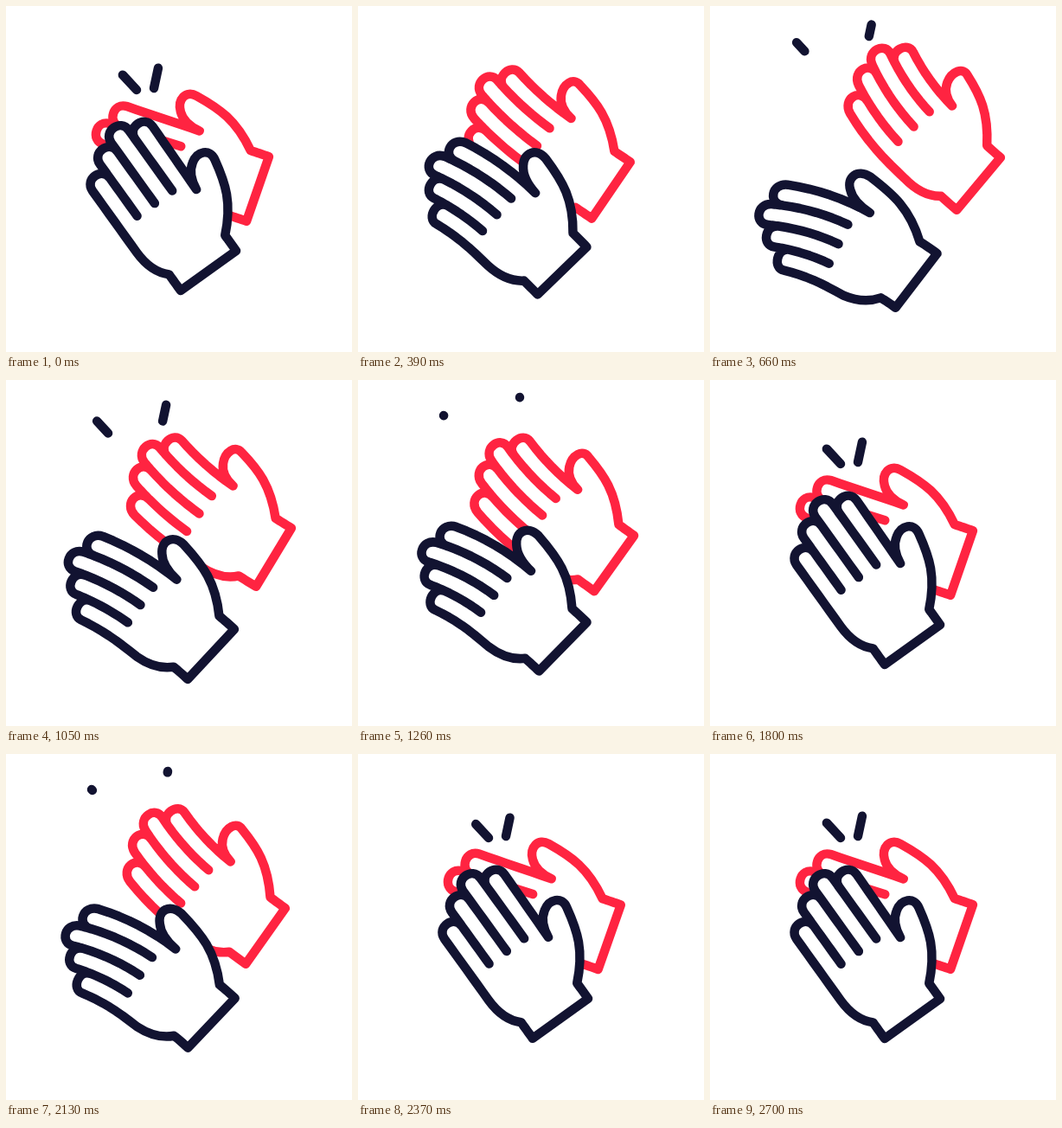
Recreate the animation shown at these times as an HTML page with a canvas. Size 400 px wide and 400 px high, loop 2730 ms.

```html
<!DOCTYPE html>
<html lang="en">
<head>
<meta charset="utf-8">
<title>Clapping hands</title>
<style>
html, body { margin: 0; height: 100%; overflow: hidden; background: #fff; }
canvas { display: block; width: 100vw; height: 100vh; }
</style>
</head>
<body>
<canvas width="400" height="400"></canvas>
<script>
const ctx = document.querySelector('canvas').getContext('2d');
const NAVY = '#121331', RED = '#ff2441';
const LOOP = 2730, CLAP = 450, SETTLE = 2160, REST = 2700;
const KNUCKLES = 85;

// One clap: times, then wrist x, wrist y, wrist angle in degrees,
// palm tilt in radians and finger curl in radians per 1000 px
const TIMES = [0, 150, 210, 330, 390];
const NAVY_POSES = [
  [234, 306, -35.7, 0, 0],
  [237, 317, -47, 0.087, 3.3],
  [238.5, 317.5, -52.5, 0.16, 4],
  [237.5, 311, -46.5, 0.115, 4],
  [236, 306, -44, 0.04, 3.4]
];
const RED_POSES = [
  [291, 211.5, -70.9, 0.025, 0],
  [309.5, 205, -58.9, -0.035, -3],
  [310.5, 205.5, -50, -0.07, -3.7],
  [300, 210.5, -54.7, -0.04, -3.4],
  [292.5, 213, -55.7, 0.01, -2.7]
];

// Smooth periodic interpolation through the poses
function poseAt(poses, phase) {
  const n = TIMES.length;
  const i = TIMES.findLastIndex(t => t <= phase);
  const time = k => TIMES[(k + n) % n] + CLAP * Math.floor(k / n);
  const span = time(i + 1) - time(i);
  const s = (phase - time(i)) / span;
  return poses[0].map((_, c) => {
    const value = k => poses[(k + n) % n][c];
    const slope = k => (value(k + 1) - value(k - 1)) / (time(k + 1) - time(k - 1)) * span;
    const a = value(i), b = value(i + 1), da = slope(i), db = slope(i + 1);
    return a + s * (da + s * (3 * (b - a) - 2 * da - db + s * (2 * (a - b) + da + db)));
  });
}

function rotate(x, y, angle) {
  const cos = Math.cos(angle), sin = Math.sin(angle);
  return [x * cos - y * sin, x * sin + y * cos];
}

function drawHand([x, y, degrees, tilt, curl], color) {
  const k = curl / 1000 || 1e-6;
  let pen;

  // Hand space (across, up from the wrist) to the stage:
  // fingers curl past the knuckles, the palm tilts on the wrist
  const place = (a, b) => {
    const turn = k * Math.max(0, b - KNUCKLES);
    const across = a * Math.cos(turn) - (1 - Math.cos(turn)) / k;
    const up = Math.min(b, KNUCKLES) + Math.sin(turn) * (1 / k + 0.8 * a);
    const [p, q] = rotate(across, up, tilt * Math.min(1, b / 60));
    const [dx, dy] = rotate(p, -q, degrees * Math.PI / 180);
    return [x + dx, y + dy];
  };
  const move = (a, b) => { ctx.moveTo(...place(a, b)); pen = [a, b]; };
  const curve = (a1, b1, a2, b2, a, b) => {
    ctx.bezierCurveTo(...place(a1, b1), ...place(a2, b2), ...place(a, b));
    pen = [a, b];
  };
  const line = (a, b) => {
    const [a0, b0] = pen;
    for (let s = 0.125; s <= 1; s += 0.125) {
      ctx.lineTo(...place(a0 + (a - a0) * s, b0 + (b - b0) * s));
    }
    pen = [a, b];
  };
  const finger = (a, b) => {
    line(a, b);
    curve(a, b + 16.7, a + 25, b + 16.7, a + 25, b);
  };

  ctx.beginPath();
  move(-39.5, 0);
  line(-39.5, 23);
  curve(-50, 33, -55, 48, -55, 66);
  finger(-55, 153);
  finger(-30, 173);
  finger(-5, 185.5);
  finger(20, 173);
  line(43.5, 84.5);
  curve(45, 97, 50, 107, 58, 112);
  curve(70, 120, 84, 114, 81, 100);
  curve(75, 70, 68, 48, 39.5, 22);
  line(39.5, 0);
  ctx.closePath();
  ctx.fill();
  for (const [a, top] of [[-30, 153], [-5, 173], [20, 173]]) {
    move(a, top);
    line(a, 99.5);
  }
  ctx.strokeStyle = color;
  ctx.stroke();
}

function drawSparks(phase) {
  const t = phase >= 390 ? phase - CLAP : phase;
  const head = t < 255 ? 1 - 0.69 * (1 - t / 255) ** 2 : 1;
  const tail = t > 0 ? 1 - (1 - t / 380) ** 2 : 0;
  if (head <= 0) return;
  ctx.strokeStyle = NAVY;
  ctx.beginPath();
  for (const [x, y, dx, dy] of [[151, 97, -52, -56], [171, 95, 16, -75]]) {
    ctx.moveTo(x + dx * tail, y + dy * tail);
    ctx.lineTo(x + dx * head, y + dy * head);
  }
  ctx.stroke();
}

// Steady claps, then the last closing eases into the rest pose
function phaseAt(time) {
  if (time < SETTLE) return time % CLAP;
  const x = Math.min(1, (time - SETTLE) / (REST - SETTLE));
  return (CLAP - 90 * (1 - x) ** 6) % CLAP;
}

function draw(now) {
  const phase = phaseAt(now % LOOP);
  ctx.fillStyle = '#fff';
  ctx.fillRect(0, 0, 400, 400);
  ctx.lineWidth = 10.5;
  ctx.lineCap = ctx.lineJoin = 'round';
  drawSparks(phase);
  drawHand(poseAt(RED_POSES, phase), RED);
  drawHand(poseAt(NAVY_POSES, phase), NAVY);
}

let start;
function tick(now) {
  start ??= now;
  draw(now - start);
  requestAnimationFrame(tick);
}
requestAnimationFrame(tick);
</script>
</body>
</html>
```
